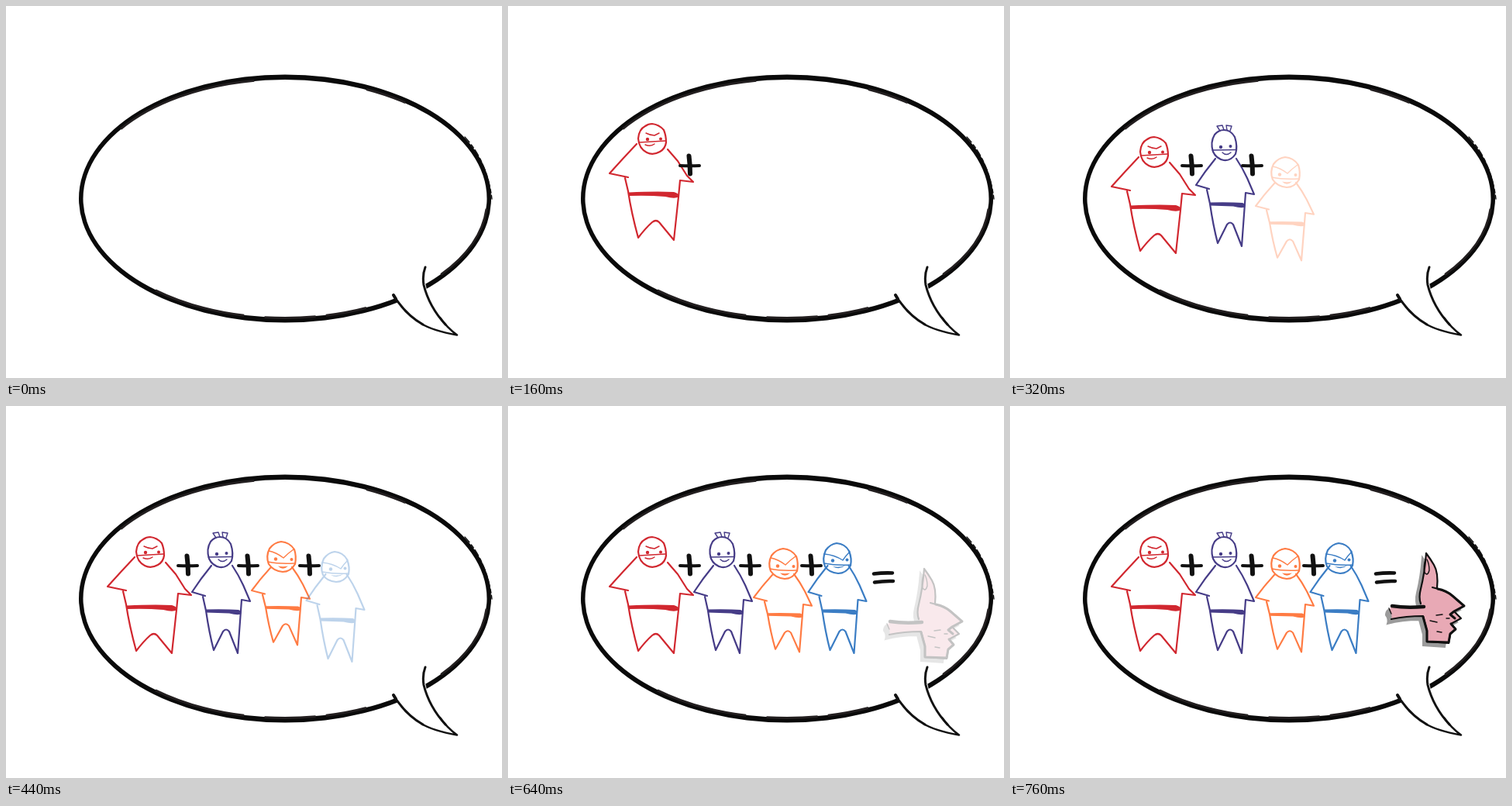
Write an HTML page without scripts that moves like this. It is 640x480 px and loops after 800 ms.

```html
<!DOCTYPE html>
<html lang="en">
<head>
<meta charset="utf-8">
<title>Team equation</title>
<style>
  html, body { margin: 0; width: 100%; height: 100%; overflow: hidden; background: #fff; }
  svg { display: block; width: 100vw; height: 100vh; }
  .line { fill: none; stroke: currentColor; stroke-width: 2.2; stroke-linecap: round; stroke-linejoin: round; }
  .thin { stroke-width: 1.4; }
  .solid { fill: currentColor; }
  .ink { color: #111; }
  .red { color: #d1272f; }
  .purple { color: #463c87; }
  .orange { color: #ff7b43; }
  .blue { color: #3b7dc4; }

  /* One 40 ms step is 5% of the loop */
  .anim { animation: 800ms step-end infinite; }
  .red.anim { animation-name: hop-red; }
  .purple.anim { animation-name: hop-purple; }
  .orange.anim { animation-name: hop-orange; }
  .blue.anim { animation-name: hop-blue; }
  .plus1 { animation-name: show-plus1; }
  .plus2 { animation-name: show-plus2; }
  .plus3 { animation-name: show-plus3; }
  .equals { animation-name: show-equals; }
  .thumb { animation-name: rise; }

  @keyframes hop-red {
    0% { opacity: 0; }
    10% { opacity: .33; transform: translateY(11px); }
    15% { opacity: .67; transform: translateY(-3px); }
    20% { opacity: 1; transform: translateY(-17px); }
    25% { transform: translateY(-9px); }
    30%, 100% { transform: none; }
  }
  @keyframes hop-purple {
    0% { opacity: 0; }
    25% { opacity: .33; transform: translateY(11px); }
    30% { opacity: .67; transform: translateY(-3px); }
    35% { opacity: 1; transform: translateY(-17px); }
    40% { transform: translateY(-9px); }
    45%, 100% { transform: none; }
  }
  @keyframes hop-orange {
    0% { opacity: 0; }
    40% { opacity: .33; transform: translateY(11px); }
    45% { opacity: .67; transform: translateY(-3px); }
    50% { opacity: 1; transform: translateY(-17px); }
    55% { transform: translateY(-9px); }
    60%, 100% { transform: none; }
  }
  @keyframes hop-blue {
    0% { opacity: 0; }
    55% { opacity: .33; transform: translateY(11px); }
    60% { opacity: .67; transform: translateY(-3px); }
    65% { opacity: 1; transform: translateY(-17px); }
    70% { transform: translateY(-9px); }
    75%, 100% { transform: none; }
  }
  @keyframes show-plus1 { 0% { opacity: 0; } 20%, 100% { opacity: 1; } }
  @keyframes show-plus2 { 0% { opacity: 0; } 35%, 100% { opacity: 1; } }
  @keyframes show-plus3 { 0% { opacity: 0; } 50%, 100% { opacity: 1; } }
  @keyframes show-equals { 0% { opacity: 0; } 75%, 100% { opacity: 1; } }
  @keyframes rise {
    0% { opacity: 0; }
    80% { opacity: .25; transform: translateY(20px); }
    85% { opacity: .5; transform: translateY(13px); }
    90% { opacity: .75; transform: translateY(7px); }
    95%, 100% { opacity: 1; transform: none; }
  }
</style>
</head>
<body>
<svg viewBox="0 0 640 480">
  <defs>
    <g id="body">
      <path class="line" d="M265 206Q251 223 240 240L257 245M292 206Q300 218 306 231L315 252L304 250L303 264L299 319L288 291Q284 286 280 291L268 315Q262 292 258 264L254 246"/>
      <path class="solid" d="M257 262.500Q285 262 300 263Q305 265 303 268.500Q299 270.500 288 267.500L258 266.500Z"/>
    </g>
    <g id="plus" class="line ink" stroke-linecap="round">
      <path stroke-width="4" style="stroke-width:4px" d="M222 206Q235 206.500 247 206"/>
      <path style="stroke-width:6px" d="M233.500 193.500Q235 205 235 216.500"/>
    </g>
    <path id="hand" d="M537 190Q543 198 547 205Q553 215 551 235Q562 238 571 245L586 258L573 265L582 274L569 281L575 288L568 294L566 306L538 304L538 290L533 271Q511 271 492 276Q494 270 490 265Q490 260 493 258Q511 261 532 259Q527 247 530 236Q535 216 537 190Z"/>
  </defs>

  <!-- Speech bubble -->
  <path fill="#0a0a0a" fill-rule="evenodd" d="M94 248.500a266 160 0 0 1 532 0a266 160 0 0 1 -532 0ZM99.500 248.500a260.500 153.500 0 0 0 521 0a260.500 153.500 0 0 0 -521 0Z"/>
  <ellipse cx="360" cy="248.500" rx="261" ry="154" fill="none" stroke="#231f20" stroke-width="3" pathLength="100" stroke-dasharray="0 1 8 8 4 1 5 2 9 20 14 11 4 13"/>
  <path class="line ink thin" stroke-dasharray="9 4 5 3" d="M592 169Q621 200 627 249"/>
  <path fill="#fff" d="M500 372Q525 414 582 425Q534 376 541 337Z"/>
  <g class="line ink">
    <path style="stroke-width:3px" d="M500 373Q515 398 538 411M541 337Q537 347 539 360Q546 388 567 411"/>
    <path style="stroke-width:2.500px" d="M536 410Q551 419 582 424.500Q569 415 560 402"/>
    <path style="stroke-width:4px" d="M500 373L503 378"/>
  </g>

  <g class="red anim">
    <path class="line" d="M186 169Q195 170 201 177Q204 184 204 193Q203 201 196 205Q187 210 179 206Q169 201 168 188Q169 176 177 172Q181 169 186 169Z"/>
    <path class="line thin" d="M169 193L203 191M178 181Q184 184 189 184L195 181M177 196Q184 199 189 195"/>
    <circle class="solid" cx="180" cy="189" r="2.200"/>
    <circle class="solid" cx="197" cy="188.500" r="2"/>
    <path class="line" d="M166 195Q149 213 131 233L155 238M206 202L219 217L231 236L239 244L222 242L220 263L214 319L195 296Q191 292 186 296Q178 303 168 316Q159 283 155 256L151 239"/>
    <path class="solid" d="M156 257.500Q190 256 214 257Q222 259 220 263.500Q215 266 203 263Q180 261 156 262Z"/>
  </g>

  <g class="purple anim">
    <path class="line" d="M276 169Q285 169 290 178Q294 190 291 200Q285 209 276 208Q266 206 262 197Q258 185 264 175Q269 169 276 169Z"/>
    <path class="line thin" d="M271 170L267 164L274 163L276 169M280 169L279 163L286 164L284 170M261 195L292 194.500M274 198Q279 203 285 198"/>
    <circle class="solid" cx="272" cy="191" r="2.200"/>
    <circle class="solid" cx="284.500" cy="190" r="2"/>
    <use href="#body"/>
  </g>

  <g class="orange anim">
    <path class="line" d="M355 184Q366 185 372 194Q375 203 373 213Q367 223 357 223Q345 222 339 213Q335 203 340 193Q346 185 355 184Z"/>
    <path class="line thin" d="M339 196Q349 198 358 205Q364 199 371 194M338 210Q352 213 372 212"/>
    <path class="solid" d="M351 215.500Q357 217 364 215.500Q357 222 351 215.500Z"/>
    <circle class="solid" cx="348" cy="206.500" r="2.200"/>
    <circle class="solid" cx="368.500" cy="207" r="2"/>
    <use href="#body" transform="matrix(1 0 0 .89 77 33.500)"/>
  </g>

  <g class="blue anim">
    <path class="line" d="M424 177Q435 178 440 187Q444 197 442 206Q436 216 426 216Q414 215 409 207Q405 197 410 186Q416 178 424 177Z"/>
    <path class="line thin" d="M408 191Q421 192 432 199Q436 193 441 188M408 203Q424 206 442 205"/>
    <path class="solid" d="M419 207Q427 209 435 206Q427 212 419 207Z"/>
    <circle class="solid" cx="419" cy="199.500" r="2.200"/>
    <circle class="solid" cx="437.500" cy="198.500" r="2"/>
    <use href="#body" transform="translate(147.500 0)"/>
  </g>

  <use class="plus1 anim" href="#plus"/>
  <g class="plus2 anim"><use href="#plus" x="78"/></g>
  <g class="plus3 anim"><use href="#plus" x="157"/></g>
  <path class="line ink equals anim" style="stroke-width:4.500px" d="M472 216.500Q484 215 496 215.500M473 227.500Q485 225.500 497 226"/>

  <g class="thumb anim">
    <use href="#hand" x="-5" y="5" fill="#9b9b9b" stroke="#9b9b9b" stroke-width="2"/>
    <use href="#hand" fill="#e8a9b5"/>
    <g class="line ink">
      <path d="M537 190Q543 198 547 205Q553 215 551 235M545 234Q562 238 571 245L586 258L573 265L582 274L569 281L575 288L568 294L566 306L538 304L538 290L533 271Q511 271 492 275M530 255Q527 247 530 236Q535 216 537 190"/>
      <path style="stroke-width:4.500px" d="M493 258Q511 261 534 259"/>
      <path style="stroke-width:3px" d="M552 236Q563 238 571 245L586 258L573 265L568 269L574 274M569 281L575 288L568 294L566 305L538 304L538 290L533 272"/>
      <path class="thin" d="M536 198Q533 208 535 215Q539 220 541 212Q541 204 538 198M542 277L551 279M550 270L558 269M563 274L567 274M551 291L557 292M489 261L492 268"/>
    </g>
  </g>
</svg>
</body>
</html>
```
